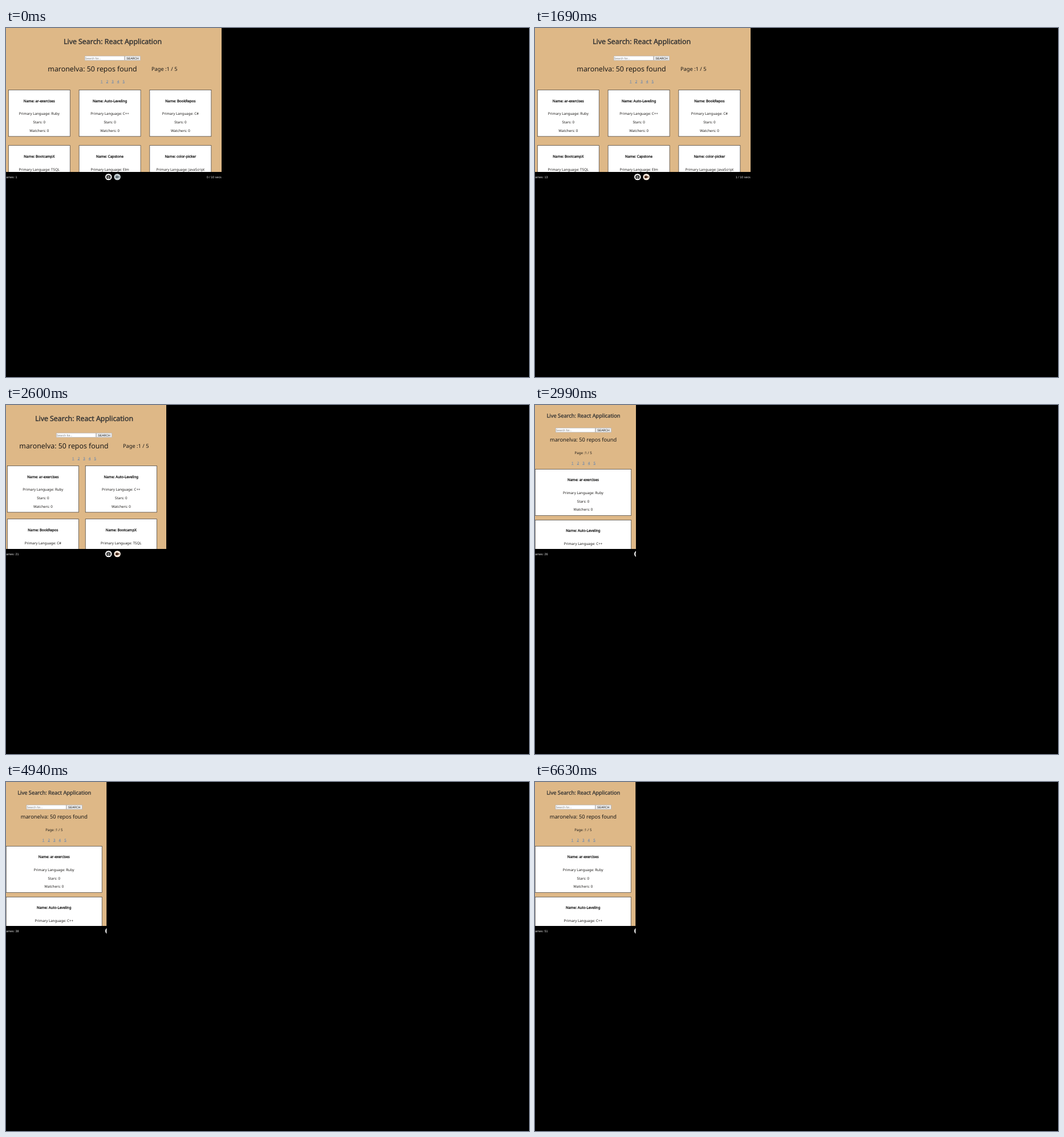
Recreate the animation shown at these times as an HTML page with a canvas. Size 917 by 611 pixels, loop 6760 ms.

```html
<!DOCTYPE html>
<html lang="en">
<head>
<meta charset="utf-8">
<title>Live Search</title>
<style>
  html, body { margin: 0; width: 100%; height: 100%; overflow: hidden; background: #000; }
  canvas { display: block; }
</style>
</head>
<body>
<canvas id="stage" width="917" height="611"></canvas>
<script>
const ctx = document.getElementById('stage').getContext('2d');
const LOOP = 6760, STEP = 130, PX = 0.3865;   // PX: page pixel to stage pixel
const SANS = '"Noto Sans", "Open Sans", sans-serif';
const UI = '"Liberation Sans", Arial, sans-serif';
const RECORD_W = 378, PAGE_H = 252, CARD_H = 81.9;
const SHRINK_AT = 16;
const SHRINK = [373, 358, 335, 308, 281, 248, 205, 177];
const SHRINK_COUNT = [16, 18, 20, 20, 21, 22, 24, 26];
const HELD = [9, 24, 26, 36];                 // steps without a new capture
const REPOS = [
  ['ar-exercises', 'Ruby'], ['Auto-Leveling', 'C++'], ['BookRepos', 'C#'],
  ['BootcampX', 'TSQL'], ['Capstone', 'Elm'], ['color-picker', 'JavaScript']
];

function text(str, x, y, size, { color = '#1c1a18', font = SANS, align = 'center', bold = 0 } = {}) {
  ctx.font = `${size * PX}px ${font}`;
  ctx.textAlign = align;
  ctx.fillStyle = ctx.strokeStyle = color;
  ctx.fillText(str, x, y);
  if (bold) {
    ctx.lineWidth = bold;
    ctx.strokeText(str, x, y);
  }
}

function box(x, y, w, h, fill, stroke, line) {
  ctx.fillStyle = fill;
  ctx.fillRect(x, y, w, h);
  ctx.strokeStyle = stroke;
  ctx.lineWidth = line;
  ctx.strokeRect(x, y, w, h);
}

function round(x, y, w, h, r, fill) {
  ctx.fillStyle = fill;
  ctx.beginPath();
  ctx.roundRect(x, y, w, h, r);
  ctx.fill();
}

function clipTo(w, h, draw) {
  ctx.save();
  ctx.beginPath();
  ctx.rect(0, 0, w, h);
  ctx.clip();
  draw();
  ctx.restore();
}

function header(c, small) {
  const big = small ? 24 : 32;
  text('Live Search: React Application', c, small ? 22.3 : 27.9, big, { color: '#333', bold: small ? 0.3 : 0.4 });

  const y = small ? 40.2 : 49.1;
  box(c - 48.8, y, 69.4, 7.6, '#fff', '#a9a9ad', 0.6);
  text('Search for...', c - 48.2, y + 5.5, 13.33, { color: '#757575', font: UI, align: 'left' });
  box(c + 21.3, y, 27.3, 7.6, '#efefef', '#a9b0bc', 0.6);
  text('SEARCH', c + 35, y + 5.5, 13.33, { color: '#111', font: UI });

  text('maronelva: 50 repos found', small ? c - 0.4 : c - 35.5, small ? 64.4 : 76, big);
  text('Page :1 / 5', small ? c - 0.4 : c + 90.7, small ? 86.1 : 75.1, small ? 16 : 24);

  for (let i = 0; i < 5; i++) {
    const x = c + (i - 2) * 9.6, base = small ? 103.7 : 95.6;
    text(i + 1, x, base, 16, { color: '#4f7cb8' });
    ctx.fillRect(x - 1.8, base + 0.6, 3.6, 0.5);
  }
}

function cards(w, small) {
  const cols = small ? 1 : w > 345 ? 3 : 2;
  const cardW = [0.88, 0.4, 0.25][cols - 1] * w + 13.3;
  const gap = 0.04 * w;
  const left = 0.02 * w - 3.6;
  const top = (small ? 108.5 : 100.6) + 0.02 * w;
  REPOS.slice(0, cols * 2).forEach(([name, lang], i) => {
    const x = left + (i % cols) * (cardW + gap);
    const y = top + Math.floor(i / cols) * (CARD_H + gap);
    const mid = x + cardW / 2;
    box(x + 0.3, y + 0.3, cardW - 0.6, CARD_H - 0.6, '#fff', '#3c3834', 0.7);
    text('Name: ' + name, mid, y + 21.3, 16, { color: '#111', bold: 0.26 });
    text('Primary Language: ' + lang, mid, y + 44.2, 16);
    text('Stars: 0', mid, y + 58.8, 16);
    text('Watchers: 0', mid, y + 73.4, 16);
  });
}

function toolbar(count, secs, pressed) {
  const label = { color: '#e4e4e4', font: UI };
  text('ames: ' + count, 0.3, 263, 14, { ...label, align: 'left' });
  text(secs + ' / 10 secs', 377.8, 263, 14, { ...label, align: 'right' });

  // photo button
  round(174.1, 255.2, 11.4, 11, 5.3, '#fff');
  round(176.3, 258.3, 7, 5.4, 1, '#111');
  round(178.2, 257.4, 3.2, 1.6, 0.5, '#111');
  round(178, 259.2, 3.6, 3.6, 1.8, '#fff');
  round(178.8, 260, 2, 2, 1, '#111');

  // video button
  const ink = pressed ? '#66737a' : '#4a2c1c';
  round(189.5, 255.2, 11.4, 11, 5.3, pressed ? '#c9d2d6' : '#fbeee2');
  round(192, 258.5, 4.9, 4.6, 0.8, ink);
  ctx.beginPath();
  ctx.moveTo(196.6, 260.8);
  ctx.lineTo(198.8, 259);
  ctx.lineTo(198.8, 262.6);
  ctx.fill();
}

function draw(now) {
  const k = Math.floor((now % LOOP) / STEP);
  const s = k - SHRINK_AT;
  const w = s < 0 ? 381 : SHRINK[s] ?? (k < 25 ? 177 : 176.5);
  const captures = k + 1 - HELD.filter(h => k >= h).length;
  const count = s < 0 ? captures : SHRINK_COUNT[s] ?? captures + 3;
  const view = Math.min(w, RECORD_W);
  const small = w < 243;

  ctx.fillStyle = '#000';
  ctx.fillRect(0, 0, 917, 611);
  ctx.textRendering = 'geometricPrecision';
  clipTo(view, PAGE_H, () => {
    ctx.fillStyle = '#deb887';
    ctx.fillRect(0, 0, view, PAGE_H);
    header(w / 2 - 3.5, small);
    cards(w, small);
  });
  clipTo(view, 611, () => toolbar(count, Math.floor(k * STEP / 1000), k === 0));
}

function tick(now) {
  draw(now);
  requestAnimationFrame(tick);
}
draw(0);
requestAnimationFrame(tick);
</script>
</body>
</html>
```
